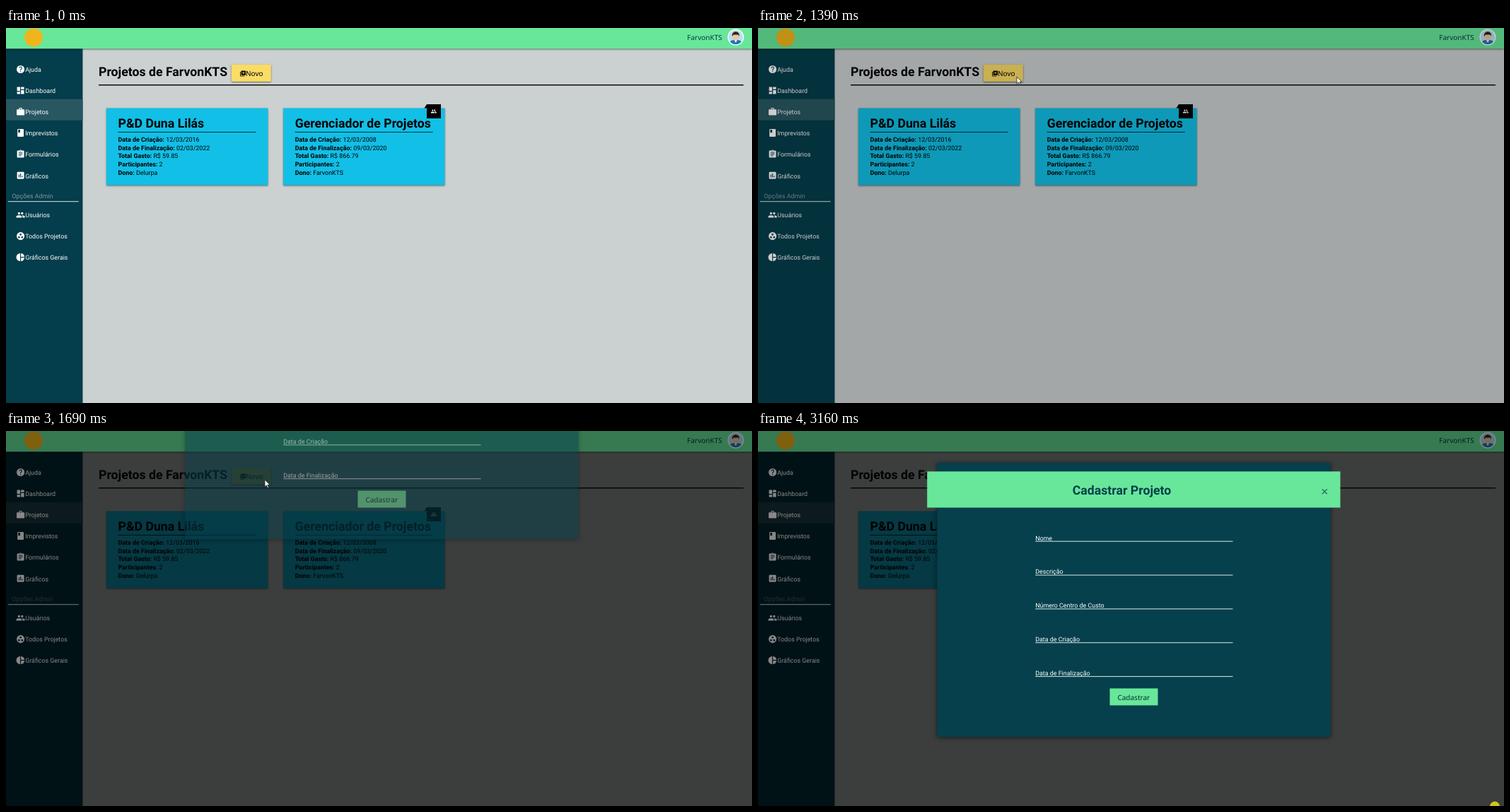
An HTML page for the animation above (3.23 s loop, 1055 by 531 pixels).

```html
<!DOCTYPE html>
<html lang="pt">
<head>
<meta charset="utf-8">
<title>Projetos</title>
<style>
html, body { margin: 0; width: 100%; height: 100%; overflow: hidden; background: #cbd0d0; }
svg { display: block; width: 100vw; height: 100vh; }
text { font: 8.9px Roboto, sans-serif; text-rendering: geometricPrecision; white-space: pre; }
.b { font-weight: 700; }
.h { font-weight: 700; font-size: 17.7px; }
.n { font: 10px "Noto Sans", sans-serif; }
.lift { filter: drop-shadow(0 1px 1.2px rgba(0,0,0,.5)); }
.icon { fill-rule: evenodd; }
</style>
</head>
<body>
<svg id="stage" viewBox="0 0 1055 531"></svg>
<script>
const LOOP = 3230, STEP = 76.9;
const USER = "FarvonKTS";

const rect = (x, y, w, h, fill, more = "") =>
  `<rect x="${x}" y="${y}" width="${w}" height="${h}" fill="${fill}" ${more}/>`;
const text = (x, y, s, cls = "", fill = "#000", anchor = "start") =>
  `<text x="${x}" y="${y}" class="${cls}" fill="${fill}" text-anchor="${anchor}">${s}</text>`;
const rule = (x, y, w, color, h = 1) => rect(x, y - h / 2, w, h, color);

// Icon outlines on a 24-unit grid, cut out by the even-odd rule
const disc = (x, y, r) => `M${x - r} ${y}a${r} ${r} 0 1 0 ${2 * r} 0a${r} ${r} 0 1 0 ${-2 * r} 0z`;
const box = (x, y, w, h) => `M${x} ${y}h${w}v${h}h${-w}z`;
const round = (x, y, w, h, r = 2) =>
  `M${x + r} ${y}h${w - 2 * r}a${r} ${r} 0 0 1 ${r} ${r}v${h - 2 * r}a${r} ${r} 0 0 1 ${-r} ${r}` +
  `h${2 * r - w}a${r} ${r} 0 0 1 ${-r} ${-r}v${2 * r - h}a${r} ${r} 0 0 1 ${r} ${-r}z`;

const shapes = {
  help: disc(12, 12, 10) + box(11, 17, 2, 2) +
    "M8 9a4 4 0 1 1 7.1 2.3C13.5 12.8 13 13.5 13 15h-2c0-2 .6-2.8 2.4-4.6A2 2 0 1 0 10 9z",
  board: box(3, 3, 8, 10) + box(3, 15, 8, 6) + box(13, 11, 8, 10) + box(13, 3, 8, 6),
  work: round(2, 6, 20, 15) + "M8 6V4a2 2 0 0 1 2-2h4a2 2 0 0 1 2 2v2h-2V4h-4v2z",
  book: round(4, 2, 16, 20) + "M6 4h5v8l-2.5-1.5L6 12z",
  form: round(3, 3, 18, 18) + "M9.2 3a3 3 0 0 1 5.6 0z" + disc(12, 4, 1) +
    box(7, 7, 10, 2) + box(7, 11, 10, 2) + box(7, 15, 7, 2),
  bars: round(3, 3, 18, 18) + box(7, 10, 2, 7) + box(11, 7, 2, 10) + box(15, 13, 2, 4),
  people: disc(16, 8, 3) + disc(8, 8, 3) + "M1 19v-2.5c0-4.6 14-4.6 14 0V19z" +
    "M17 19v-2.5c0-1.5-.8-2.6-2-3.4 3-.4 8 .9 8 3.4V19z",
  group: disc(12, 12, 10) + disc(12, 8, 2.5) + disc(8, 15, 2.5) + disc(16, 15, 2.5),
  pie: "M11 2v20a10 10 0 0 1 0-20zM13 2v9h9a10 10 0 0 0-9-9zM13 13v9a10 10 0 0 0 9-9z",
  add: "M2 6h2v14h14v2H4a2 2 0 0 1-2-2z" + round(6, 2, 16, 16) +
    "M13 5h2v4h4v2h-4v4h-2v-4H9V9h4z"
};
const icon = (name, cx, cy, scale = .555, fill = "#fff") =>
  `<path class="icon" fill="${fill}" d="${shapes[name]}" transform="translate(${cx} ${cy}) scale(${scale}) translate(-12 -12)"/>`;

const menu = [
  ["help", "Ajuda", 58.5], ["board", "Dashboard", 88.5], ["work", "Projetos", 118.5],
  ["book", "Imprevistos", 148.5], ["form", "Formulários", 178.5], ["bars", "Gráficos", 208.7],
  ["people", "Usuários", 264.6], ["group", "Todos Projetos", 294.6], ["pie", "Gráficos Gerais", 324.6]
];

function card(x, title, values) {
  const keys = ["Data de Criação", "Data de Finalização", "Total Gasto", "Participantes", "Dono"];
  return rect(x, 113.5, 228.3, 109, "#12bfe6", 'class="lift"') +
    text(x + 16.5, 141, title, "h") + rule(x + 16.5, 147.5, 195, "#07323d") +
    keys.map((key, i) => text(x + 16.5, 160.9 + i * 11.7,
      `<tspan class="b">${key}:</tspan> ${values[i]}`)).join("");
}

const page =
  rect(0, 0, 1055, 531, "#cbd0d0") +
  rect(0, 29, 108.5, 502, "#043d4b") + rect(0, 100.7, 108.5, 30, "#285762") +
  text(8.5, 240.6, "Opções Admin", "", "#80979d") +
  text(131, 68, "Projetos de " + USER, "h") + rule(131, 80.7, 912, "#000", 1.4) +
  rect(318.8, 51.8, 56, 24, "#fbdc65", 'class="lift"') +
  icon("add", 335, 64.5, .4, "#000") + text(339, 67.7, "Novo", "n") +
  card(142, "P&amp;D Duna Lilás", ["12/03/2016", "02/03/2022", "R$ 59.85", 2, "Delurpa"]) +
  card(392.2, "Gerenciador de Projetos", ["12/03/2008", "09/03/2020", "R$ 866.79", 2, USER]) +
  '<path d="M591.5 113.5L595 108v5.5z"/>' + rect(595, 108, 20, 20, "#000") +
  icon("people", 604.8, 118, .36);

const bright =
  rect(0, 0, 1055, 29.3, "#68e79a", 'class="lift"') +
  '<circle cx="39" cy="13.5" r="13" fill="#efb51c"/>' +
  text(963.3, 17.2, USER, "n", "#063a47") +
  `<g transform="translate(1032 13)"><circle r="11.5" fill="#fff"/><circle r="10.2" fill="#b9dfee"/>
   <path d="M-8 6.3C-6 3 6 3 8 6.3A10.2 10.2 0 0 1-8 6.3z" fill="#2378b5"/>
   <path d="M-2.5 3h5L0 8z" fill="#fff"/><ellipse cy="-.6" rx="4.2" ry="5" fill="#f1c39c"/>
   <path d="M-5-1C-7-10 7-10 5-1L3.8-3.5h-7.2z" fill="#2c2420"/></g>` +
  menu.map(([name, label, y]) => icon(name, 20.6, y) + text(27.2, y + 3.8, label, "", "#fff")).join("") +
  rule(3, 245.7, 99.7, "#e3e8e9");

const fields = ["Nome", "Descrição", "Número Centro de Custo", "Data de Criação", "Data de Finalização"];
const modal =
  rect(253.3, 45, 556.2, 388, "#05404c", 'style="filter:drop-shadow(0 1px 3px #0009)"') +
  rect(239.2, 57.3, 584.3, 51.2, "#68e79a") +
  text(514.5, 90, "Cadastrar Projeto", "h", "#05404c", "middle") +
  '<path d="M797.8 82.3l7 7m0-7l-7 7" stroke="#2d6b55" stroke-width="1.3"/>' +
  fields.map((label, i) => text(392.2, 154.6 + i * 47.85, label, "", "#fff") +
    rule(392.2, 156.2 + i * 47.85, 279.3, "#dfe8e9")).join("") +
  rect(497.5, 364.5, 68, 24, "#68e79a") + text(531.3, 380.6, "Cadastrar", "n", "#062a30", "middle");

const stage = document.getElementById("stage");
stage.innerHTML = `<g id="page">${page}</g><rect id="shade" width="1055" height="531"/>
  <g id="bright">${bright}</g><g id="modal">${modal}</g>
  <circle id="click" cx="1042" cy="531.6" r="7" fill="#cfc51f"/>
  <path id="cursor" d="M0 0v10l2.3-2.1 1.6 3.6 1.6-.7-1.6-3.5h3.2z" fill="#fff" stroke="#222" stroke-width=".8"/>`;
const part = Object.fromEntries(["shade", "bright", "modal", "click", "cursor"]
  .map(id => [id, document.getElementById(id)]));
const show = (el, on) => el.setAttribute("visibility", on ? "visible" : "hidden");

// Pointer path: step, x, y
const path = [
  [5, 968, 470], [6, 800, 352], [7, 600, 230], [8, 480, 147], [9, 413.5, 103], [11, 380, 82],
  [12, 366, 69], [25, 366, 69], [26, 470, 140], [27, 690, 270], [28, 938, 415],
  [29, 1010, 465], [31, 1050, 499], [34, 1044, 526]
];
function pointer(k) {
  const i = path.findIndex(p => p[0] >= k);
  if (i < 1) return k === path[0][0] ? path[0].slice(1) : null;
  const [a, ax, ay] = path[i - 1], [b, bx, by] = path[i], f = (k - a) / (b - a);
  return [ax + (bx - ax) * f, ay + (by - ay) * f];
}

function draw(t) {
  const k = Math.floor((t + 6) / STEP);
  const dim = k < 17 ? 0 : [.055, .2, .4][k - 17] ?? .7;
  part.shade.setAttribute("opacity", dim);
  part.bright.style.filter = `brightness(${1 - Math.min(dim, .47)})`;

  const p = k < 22 ? 0 : k > 25 ? 1 : 1 - .5 * .37 ** (k - 22);
  show(part.modal, p > 0);
  part.modal.setAttribute("opacity", p);
  part.modal.setAttribute("transform", `translate(0 ${-560 * (1 - p)})`);

  const at = pointer(k);
  show(part.cursor, at);
  if (at) part.cursor.setAttribute("transform", `translate(${at})`);
  show(part.click, k >= 37);
}

const start = performance.now();
function tick() {
  draw((performance.now() - start) % LOOP);
  requestAnimationFrame(tick);
}
tick();
</script>
</body>
</html>
```
